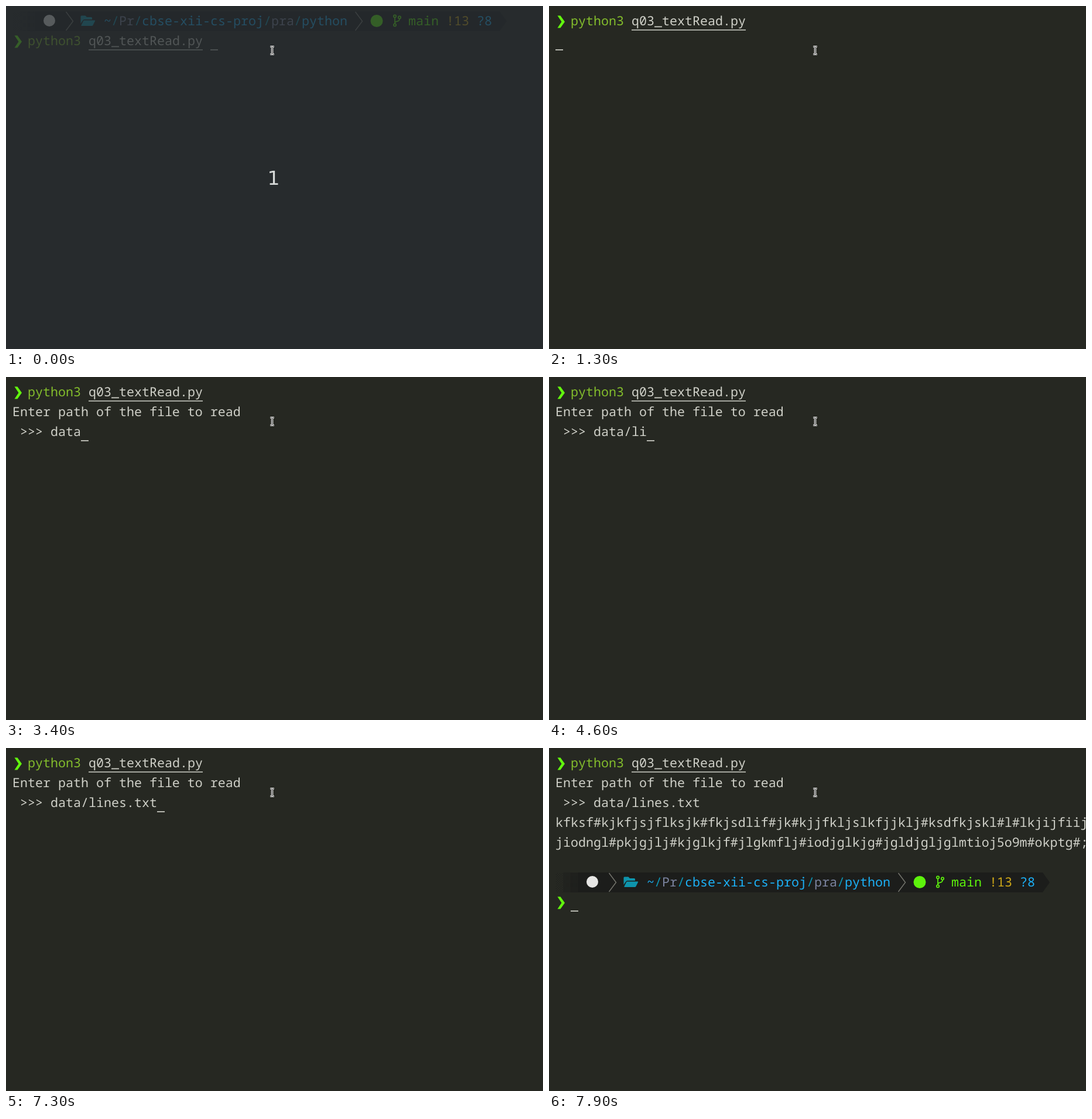
An HTML page for the animation above (8000 ms loop, 917x587 px).

```html
<!DOCTYPE html>
<html lang="en">
<head>
<meta charset="utf-8">
<title>Terminal session</title>
<style>
  html, body { margin: 0; width: 100%; height: 100%; overflow: hidden; background: #262822; }
  svg { display: block; width: 917px; height: 587px; }
  text { font: 21.667px "Noto Sans Mono", "DejaVu Sans Mono", monospace; white-space: pre; text-rendering: geometricPrecision; }
  #count text { font: 33px "DejaVu Sans", sans-serif; }
</style>
</head>
<body>
<svg id="stage" viewBox="0 0 917 587">
  <defs>
    <pattern id="light" width="4" height="4" patternUnits="userSpaceOnUse">
      <path d="M0 0h1v1h-1zM2 2h1v1h-1z" fill="#1c1d1b"/>
    </pattern>
    <pattern id="medium" width="2" height="2" patternUnits="userSpaceOnUse">
      <path d="M0 0h1v1h-1zM1 1h1v1h-1z" fill="#1c1d1b"/>
    </pattern>
    <pattern id="dense" width="2" height="2" patternUnits="userSpaceOnUse">
      <path d="M0 0h2v1h-2zM1 1h1v1h-1z" fill="#1c1d1b"/>
    </pattern>
    <path id="chevron" d="M14.5 16.5H19.5L27 27L19.5 37.5H14.5L21.5 27Z" fill="#62f50e"/>
  </defs>
  <rect width="917" height="587" fill="#262822"/>

  <g id="prompt">
    <rect x="11" y="9" width="13" height="34" fill="url(#light)"/>
    <rect x="24" y="9" width="13" height="34" fill="url(#medium)"/>
    <rect x="37" y="9" width="13" height="34" fill="url(#dense)"/>
    <path d="M50 9H843L855 26L843 43H50Z" fill="#1c1d1b"/>
    <circle cx="74" cy="25" r="10" fill="#e6e6e4"/>
    <path d="M102.5 10L114.5 26L102.5 42M596.5 10L608.5 26L596.5 42" fill="none" stroke="#77776f" stroke-width="1.4"/>
    <path d="M127.5 30V18Q127.5 16.5 129 16.5H135.500L138 19H145.500Q147 19 147 20.500V23H134Q132 23 131 25Z
             M134 24.500H151.500Q152.500 24.500 152 25.700L148.500 32.800Q148 34 146.500 34H129Q128 34 128.500 33L132 25.700Q132.500 24.500 134 24.500Z" fill="#0e94ac"/>
    <circle cx="633" cy="25.500" r="10.500" fill="#5df20c"/>
    <g fill="none" stroke="#5df20c" stroke-width="1.7">
      <circle cx="664" cy="17.500" r="2.200"/>
      <circle cx="664" cy="32.500" r="2.200"/>
      <circle cx="672" cy="19.500" r="2.200"/>
      <path d="M664 20V30M672 22Q672 25.500 668 26.200Q664 27 664 30"/>
    </g>
  </g>

  <g id="command">
    <use href="#chevron"/>
    <rect x="141" y="40.300" width="195" height="1.500" fill="#cfd0c8"/>
  </g>
  <g id="question"></g>
  <g id="output"><use href="#chevron" y="238"/></g>
  <rect id="caret" width="13" height="1.700" fill="#cfd0c8"/>

  <g id="count">
    <rect width="917" height="587" fill="rgb(39,44,49)" fill-opacity=".75"/>
    <text x="457" y="306" text-anchor="middle" fill="#d6d9d8">1</text>
  </g>
  <g fill="none">
    <path id="beam" d="M451.500 69.500H453.500L454.500 70.500L455.500 69.500H457.500M454.500 70.500V81.500M451.500 82.500H453.500L454.500 81.500L455.500 82.500H457.500" stroke="#f4f4f4" stroke-width="3.200"/>
    <use href="#beam" style="stroke:#111"/>
    <path d="M451.500 69.500H453.500L454.500 70.500L455.500 69.500H457.500M454.500 70.500V81.500M451.500 82.500H453.500L454.500 81.500L455.500 82.500H457.500" stroke="#161614" stroke-width="1"/>
  </g>
</svg>
<script>
const LOOP = 8000, CELL = 13, LINE = 34, LEFT = 11;
const INK = '#cfd0c8', BLUE = '#1cb0f6', GREY = '#7c84a0', TEAL = '#0e94b4', GREEN = '#5df20c';
const PATH = 'data/lines.txt';
const $ = id => document.getElementById(id);

function write(group, row, col, str, fill = INK) {
  const el = document.createElementNS('http://www.w3.org/2000/svg', 'text');
  el.setAttribute('x', LEFT + col * CELL);
  el.setAttribute('y', 33 + row * LINE);
  el.setAttribute('fill', fill);
  el.textContent = str;
  $(group).append(el);
  return el;
}

let col = 12;
for (const [str, fill] of [['~', BLUE], ['/', TEAL], ['Pr', GREY], ['/', TEAL], ['cbse-xii-cs-proj', BLUE],
  ['/', TEAL], ['pra', GREY], ['/', TEAL], ['python', BLUE]]) {
  write('prompt', 0, col, str, fill);
  col += str.length;
}
write('prompt', 0, 52, 'main', GREEN);
write('prompt', 0, 57, '!13', '#cfa818');
write('prompt', 0, 61, '?8', BLUE);

write('command', 0, 2, 'python3', '#83bd2c');
write('command', 0, 10, 'q03_textRead.py');

write('question', 1, 0, 'Enter path of the file to read');
write('question', 2, 1, '>>>');
const typed = write('question', 2, 5, '');

write('output', 3, 0, 'kfksf#kjkfjsjflksjk#fkjsdlif#jk#kjjfkljslkfjjklj#ksdfkjskl#l#lkjijfiij');
write('output', 4, 0, 'jiodngl#pkjgjlj#kjglkjf#jlgkmflj#iodjglkjg#jgldjgljglmtioj5o9m#okptg#;');

// [start ms, letters typed, caret shown]
const steps = [
  [0, 0, 1], [1000, 0, 0], [1300, 0, 1], [2000, 0, 0], [2600, 0, 1],
  [2900, 2, 1], [3200, 3, 1], [3400, 4, 1], [4000, 4, 0], [4100, 5, 1],
  [4400, 6, 1], [4600, 7, 1], [4900, 9, 1], [5700, 9, 0], [5800, 10, 1],
  [6400, 10, 0], [6500, 11, 1], [6800, 12, 1], [7000, 13, 1], [7300, 14, 1],
  [7800, 14, 0], [7900, 14, 1]
];

const show = (id, on) => $(id).setAttribute('visibility', on ? 'visible' : 'hidden');
const drop = (id, rows) => $(id).setAttribute('transform', `translate(0 ${rows * LINE})`);

function caretCell(t, letters) {
  if (t < 1300) return [1, 26];
  if (t < 1500) return [1, 0];
  return t < 7900 ? [2, 5 + letters] : [7, 2];
}

function render(t) {
  const [, letters, caretOn] = steps.findLast(s => s[0] <= t);
  const started = t >= 1300, done = t >= 7900;
  show('count', t < 200);
  show('prompt', !started || done);
  drop('prompt', done ? 6 : 0);
  drop('command', started ? 0 : 1);
  show('question', t >= 1500);
  show('output', done);
  typed.textContent = PATH.slice(0, letters);
  const [row, column] = caretCell(t, letters);
  $('caret').setAttribute('x', LEFT + column * CELL);
  $('caret').setAttribute('y', 40.2 + row * LINE);
  show('caret', caretOn);
}

const begin = performance.now();
function tick() {
  render((performance.now() - begin) % LOOP);
  requestAnimationFrame(tick);
}
tick();
</script>
</body>
</html>
```
